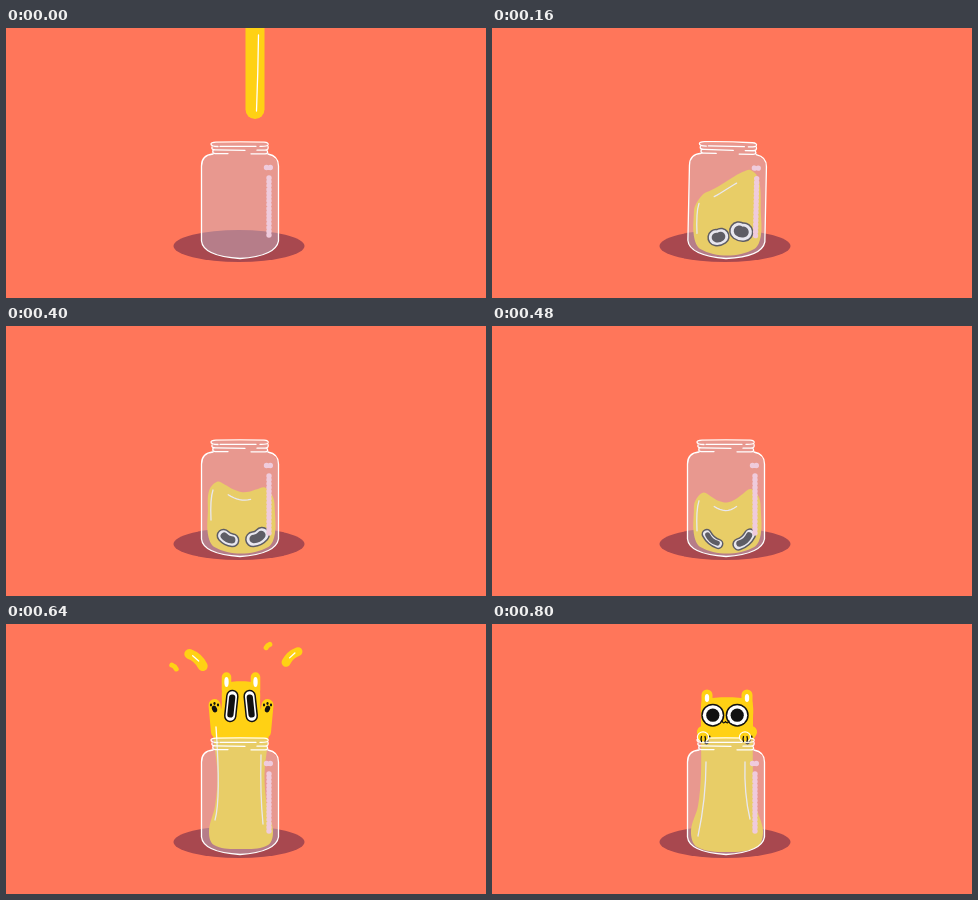
Recreate the animation shown at these times as an HTML page. Size 480x270 px, loop 0.96 s.

```html
<!DOCTYPE html>
<html lang="en">
<head>
<meta charset="utf-8">
<title>Jelly cat in a jar</title>
<style>
html, body { margin: 0; width: 100%; height: 100%; overflow: hidden; background: #ff765a; }
svg { display: block; width: 100vw; height: 100vh; }
path { stroke-linecap: round; stroke-linejoin: round; }
.line { fill: none; stroke: #fff; stroke-width: 1.3; }
.ink { fill: none; stroke: #111; stroke-width: 1.3; }
.chalk { fill: none; stroke: #efcbdc; stroke-width: 5.4; stroke-dasharray: 0 3.8; }
</style>
</head>
<body>
<svg viewBox="0 0 480 270">
  <rect width="480" height="270" fill="#ff765a"/>
  <ellipse cx="233" cy="218" rx="65.5" ry="16" fill="#a8484f"/>
  <g id="back"></g>
  <g id="jar">
    <path d="M206 115H261L262 124Q263 127 268 130Q272.5 133 272.5 140V213Q270 228 234 230.5Q197 228 195.5 212V140Q195 132 200 129Q206 127 206 123Z" fill="#c8c6da" fill-opacity=".42"/>
    <path class="chalk" d="M263 150V207M260.5 139.5H264.5"/>
    <path class="line" d="M207 126Q195.500 127 195.500 138V213Q197 228 234 230.500Q270 228 272.500 213V138Q272.500 128 262 126"/>
    <path class="line" d="M212 118.500Q205 118.500 205 116Q205 114.500 210 114.200Q234 113.400 258 114.200Q263 114.500 262 117Q261 118.600 254 118.400M214 118.300H250M206 119Q205 122 210 121.800L239 122.300M251 122.200H259Q263 122 262 118.500M207 122.500Q206 126 210 125.600H222M245 125.800H259Q263 125.500 261 122.500"/>
  </g>
  <g id="front"></g>
</svg>
<script>
const YELLOW = '#ffd114', STEP = 80, LOOP = 960, MID = 235;
const $ = id => document.getElementById(id);
const mix = (a, b, k) => a + (b - a) * k;
const all = (list, fn) => list.map(fn).join('');
const sides = fn => all([-1, 1], fn);

const line = d => `<path class="line" d="${d}"/>`;
const stroke = (d, w, color = YELLOW) =>
  `<path d="${d}" fill="none" stroke="${color}" stroke-width="${w}"/>`;
const oval = (x, y, rx, ry, color = YELLOW, r = 0) =>
  `<ellipse rx="${rx}" ry="${ry}" fill="${color}" transform="translate(${x} ${y}) rotate(${r})"/>`;
const place = (x, y, r, inner) => `<g transform="translate(${x} ${y}) rotate(${r})">${inner}</g>`;
const bow = (len, bend) => `M0 ${-len}Q${bend * 2} 0 0 ${len}`;

// Smooth closed shape through the points.
function blob(p) {
  const n = p.length, at = i => p[(i + n) % n];
  const dir = i => {
    const [a, b] = [at(i - 1), at(i + 1)];
    const x = b[0] - a[0], y = b[1] - a[1], len = Math.hypot(x, y);
    return [x / len, y / len];
  };
  const d = all(p, (a, i) => {
    const b = at(i + 1), u = dir(i), v = dir(i + 1);
    const h = Math.hypot(b[0] - a[0], b[1] - a[1]) / 3;
    return `C${a[0] + u[0] * h} ${a[1] + u[1] * h} ${b[0] - v[0] * h} ${b[1] - v[1] * h} ${b}`;
  });
  return `<path fill="${YELLOW}" d="M${p[0]}${d}Z"/>`;
}

// Rounded upright fingers of jelly: centre, top, width.
const fingers = (list, base) =>
  all(list, ([x, top, w]) => stroke(`M${x} ${top + w / 2}V${base}`, w));

// An eye is a bent capsule; with no length it is a circle.
function eye(x, y, len, w, r = 0, bend = 0) {
  const d = bow(Math.max(len, .01), bend);
  return place(x, y, r, stroke(d, w + 3, '#111') + stroke(d, w, '#fff') +
    stroke(bow(Math.max(len * .85, .01), bend), w * .66, '#111'));
}

// Drops fly outwards, turn over and shrink at the end.
const spray = [
  { x: 189, y: 57, vx: -21, vy: -14, len: 3, w: 5 },
  { x: 208, y: 49, vx: -18, vy: -13, len: 9, w: 10 },
  { x: 253, y: 35, vx: 9, vy: -13, len: 2.5, w: 5 },
  { x: 270, y: 41, vx: 16, vy: -8, len: 8, w: 9 }
];
function drops(s) {
  const size = s > 1 ? .6 : 1;
  return all(spray, ({ x, y, vx, vy, len, w }) => {
    const side = Math.sign(vx), l = len * size;
    return place(x + vx * s, y + vy * s, side * (24 + 24 * s),
      stroke(bow(l, -side * l * .2), w * size) +
      (len > 5 ? line(`M${-side} ${-l * .6}V${l * .3}`) : ''));
  });
}

const pour = () => ({
  back: stroke('M249 -12V81.500', 19) + line('M252.500 7Q252 45 250.500 83')
});

const land = () => ({
  tilt: 3.8,
  back: stroke('M249 81C247 132 256 140 256 205', 19) + stroke('M256.500 165L257 203', 27) +
    oval(238, 207, 33, 20) +
    fingers([[212, 186, 14], [222, 195, 12], [231.5, 169, 11]], 207) +
    oval(215, 170, 3.8, 8) + oval(226, 150, 3, 4.5) +
    line('M251 94Q249 128 252 139Q256 150 262 159M209 194Q208 204 212 212') +
    eye(256, 187, 10, 10, 8, -2) + eye(234, 214, 8, 11, 98, -1.5)
});

// The liquid swings from side to side, then sags in the middle.
function slosh(n) {
  const q = (n - 1) / 2, swing = 13 * (-.62) ** n;
  const level = 145 + 16 * Math.abs(q), sag = -5 * Math.max(0, q);
  const top = u => level - swing * -Math.cos(Math.PI * u) * 1 +
    sag * Math.cos(2 * Math.PI * u) + 12 * Math.abs(2 * u - 1) ** 8;
  const surface = (from, to, drop) => Array.from({ length: 9 }, (_, i) => {
    const u = mix(from, to, i / 8);
    return [203 + 64 * u, top(u) + drop];
  });
  const wall = [[36, 185], [36, 208], [29, 221]];
  const mirror = wall.map(([x, y]) => [MID - x * .92, y]).reverse();
  const w = 18 - 7 * Math.abs(q), len = 5 * Math.abs(q);
  return {
    tilt: 1.2 * .2 ** n,
    back: blob([...surface(0, 1, 0), ...wall.map(([x, y]) => [MID + x * .94, y]), [MID, 227.5], ...mirror]) +
      (q < .5 && q >= 0 ? oval(256, 142, 3, 3.6) : '') +
      line('M' + surface(.3, .65, 8).join('L')) +
      line(`M207 ${top(.1) + 8}Q204 ${top(.1) + 17} 205 ${top(.1) + 38}`) +
      eye(225 - 3 * q, 210 + 2 * q, len, w, 90 + 27 * q, len * .2) +
      eye(250 + 1.5 * q, 206 + 5 * q, len, w + 2, 90 - 27 * q, len * .2)
  };
}

const burst = () => ({
  back: drops(0) +
    `<path fill="${YELLOW}" d="M207.500 84H260V130L257 196H210L207.500 130Z"/>` +
    fingers([[212, 69, 9], [229, 47, 12], [246, 46, 11], [238, 56, 29], [256.5, 66, 8]], 100) +
    stroke('M219 185L216.500 213', 18) + stroke('M247 185L251 212', 19) +
    stroke('M228 53V59M245 52V59', 3, '#fff') + line('M210 75V96M258.500 71V86') +
    eye(222, 145, 38, 7, -1, -2.5) + eye(248, 144.500, 38.5, 7, 1, -2)
});

// The cat sinks from its leap (0) to holding the rim (1).
function cat(k) {
  const at = (a, b) => mix(a, b, k);
  const half = [
    [at(17, 23), at(59, 75)], [at(19, 26), at(67, 82)], [at(20, 26), at(86, 95)],
    [at(28, 26), at(98, 112)], [at(23.5, 26), 150], [at(26, 29), 182],
    [at(32, 36), 207], [at(27, 30), at(221, 223)]
  ];
  const left = half.map(([x, y]) => [MID - x, y]).reverse();
  const paw = [at(26.5, 21), at(81, 113)];
  return {
    back: drops(1 + k * .9) +
      blob([...half.map(([x, y]) => [MID + x, y]), [MID, at(225, 228)], ...left]) +
      sides(s => {
        const ear = MID + s * at(14.5, 20), x = MID + s * paw[0], y = paw[1];
        return stroke(`M${ear} ${at(53, 71)}V${at(66, 85)}`, at(9.5, 11)) +
          oval(ear, at(58, 74), 2.2, at(5, 4), '#fff') +
          stroke(`M${x} ${y}L${MID + s * 24} 108`, 12) +
          oval(x, y + 4, 2.5, 3.5, '#111', s * 20) +
          all([-1, 0, 1], i => oval(x + i * 3.5, y - 1.5 + Math.abs(i) * 1.5, 1.1, 1.4, '#111')) +
          eye(MID + s * at(9.7, 12.2) - 2 * k, at(82, 91.2), at(10, 0), at(9.5, 20), s * at(-6, 0));
      }) +
      line(`M${at(210, 214)} ${at(103, 138)}Q${at(215, 214)} 175 ${at(209, 206)} ${at(196, 212)}`) +
      line(`M${at(255, 253)} ${at(131, 138)}Q${at(254, 252)} 170 ${at(257, 258)} ${at(200, 195)}`)
  };
}

const grip = x => `<ellipse cx="${x}" cy="113" rx="5.6" ry="5.2" fill="${YELLOW}" stroke="#fff" stroke-width="1.2"/>` +
  `<path class="ink" d="M${x - 1.5} 112.500q-1 2.500 0 5M${x + 2} 112.500q1 2.500 0 5"/>`;
const hold = () => ({
  back: cat(1).back.replace(/^.*?(?=<path fill)/, ''),
  front: grip(211) + grip(253) + '<path class="ink" d="M230 97q1.500 3.500 3.500 .5q2 3 3.500 -.5"/>'
});

const pose = i =>
  i < 1 ? pour() : i < 2 ? land() : i < 7 ? slosh(i - 2) :
  i < 8 ? burst() : i < 10 ? cat((i - 8) / 2) : hold();

let shown = -1;
const start = performance.now();
function tick() {
  const i = Math.min(10, Math.floor((performance.now() - start) % LOOP / STEP));
  if (i !== shown) {
    const { back, front = '', tilt = 0 } = pose(shown = i);
    $('back').innerHTML = back;
    $('front').innerHTML = front;
    $('jar').setAttribute('transform', `rotate(${tilt} 234 231)`);
  }
  requestAnimationFrame(tick);
}
tick();
</script>
</body>
</html>
```
